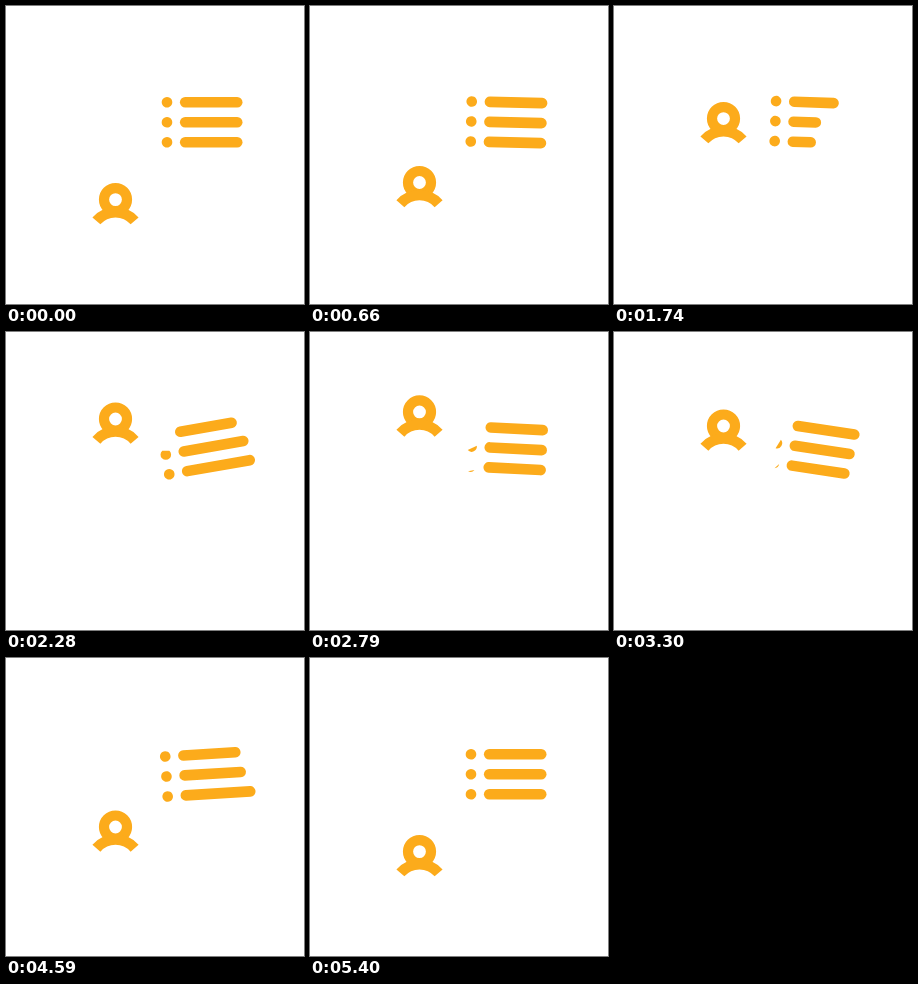
Write an HTML page that moves like this. It is 298 by 298 pixels and loops after 5.43 s.

```html
<!DOCTYPE html>
<html lang="en">
<head>
<meta charset="utf-8">
<title>User and list</title>
<style>
  html, body { margin: 0; width: 100%; height: 100%; overflow: hidden; background: #fff; }
  svg { display: block; width: 100vw; height: 100vh; }
</style>
</head>
<body>
<svg viewBox="0 0 298 298">
  <g id="person" fill="none" stroke="#fcab1b">
    <circle cx="109.5" cy="193.6" r="11.5" stroke-width="10.2"/>
    <path d="M90.4 214.9A25.25 25.25 0 0 1 128.6 214.9" stroke-width="10.5"/>
  </g>
  <g id="list" fill="#fcab1b" stroke="#fcab1b" stroke-linecap="round"></g>
</svg>
<script>
const LOOP = 5430, STEP = 30, LAST = 5400;
const RADIUS = 5.3, DOT_X = 161, LINE_X = 179.2;
const ROW_TOP = 96.3, ROW_GAP = 20, ROW_COUNT = 3, LAG = 150;
const PIVOT = '196.5 126.3';

const person = document.getElementById('person');
const list = document.getElementById('list');

function add(tag, attributes) {
  const node = document.createElementNS('http://www.w3.org/2000/svg', tag);
  for (const name in attributes) node.setAttribute(name, attributes[name]);
  return list.appendChild(node);
}

const rows = Array.from({ length: ROW_COUNT }, (_, i) => {
  const y = ROW_TOP + i * ROW_GAP;
  return {
    y,
    dot: add('path', { stroke: 'none' }),
    line: add('line', { x1: LINE_X, y1: y, y2: y, 'stroke-width': RADIUS * 2 })
  };
});

// Eases from 0 to 1 between two times.
function ramp(t, from, to) {
  const s = Math.min(1, Math.max(0, (t - from) / (to - from)));
  return s * s * (3 - 2 * s);
}

const lift = t => 114 * (ramp(t, 0, 2700) - ramp(t, 2700, 5400));

// Swings of 900 ms each, to 10 degrees either side and back to level.
const tilt = t => [10, -20, 20, -20, 10].reduce(
  (angle, swing, i) => angle + swing * ramp(t, 450 + 900 * i, 1350 + 900 * i), 0);

// Grow, shrink, overshoot and settle, twice; each row lags the one above.
function lineLength(t, row) {
  const local = t - row * LAG;
  const u = local < 2550 ? local : local - 2250;
  return 52 + 5.6 * ramp(u, 600, 1150) - 41 * ramp(u, 1180, 1470)
    + 48 * ramp(u, 1470, 2030) - 12.6 * ramp(u, 2030, 2290);
}

// Share of a dot's outline that shows: a short blink, then a long wipe.
function dotShare(t, row) {
  const lag = row * LAG, middle = 900 + lag;
  const blink = ramp(t, middle - 150, middle - 20) - ramp(t, middle + 20, middle + 150);
  const sliver = Math.max(0, [0, .4, .2][row] - .2 * ramp(t, 3300, 4050));
  const wipe = ramp(t, 1800 + 2 * lag, 2220 + 2 * lag) - ramp(t, 4080, 4440);
  return 1 - blink - wipe * (1 - sliver);
}

const dotFacing = (t, row) => 85 + 15 * row - .075 * (t - 2280);

// The part of a disc cut off by the chord of a partial outline.
function segment(x, y, share, facing) {
  if (share < .01) return '';
  const half = Math.min(share, .9999) * Math.PI, middle = facing * Math.PI / 180;
  const point = a => `${x + RADIUS * Math.cos(a)} ${y + RADIUS * Math.sin(a)}`;
  return `M${point(middle - half)}A${RADIUS} ${RADIUS} 0 ${+(share > .5)} 1 ${point(middle + half)}Z`;
}

function draw(t) {
  person.setAttribute('transform', `translate(0 ${-lift(t)})`);
  list.setAttribute('transform', `rotate(${tilt(t)} ${PIVOT})`);
  rows.forEach(({ y, dot, line }, i) => {
    dot.setAttribute('d', segment(DOT_X, y, dotShare(t, i), dotFacing(t, i)));
    line.setAttribute('x2', LINE_X + lineLength(t, i));
  });
}

const start = performance.now();
function tick() {
  const t = (performance.now() - start) % LOOP;
  draw(Math.min(LAST, Math.floor(t / STEP) * STEP));
  requestAnimationFrame(tick);
}
tick();
</script>
</body>
</html>
```
